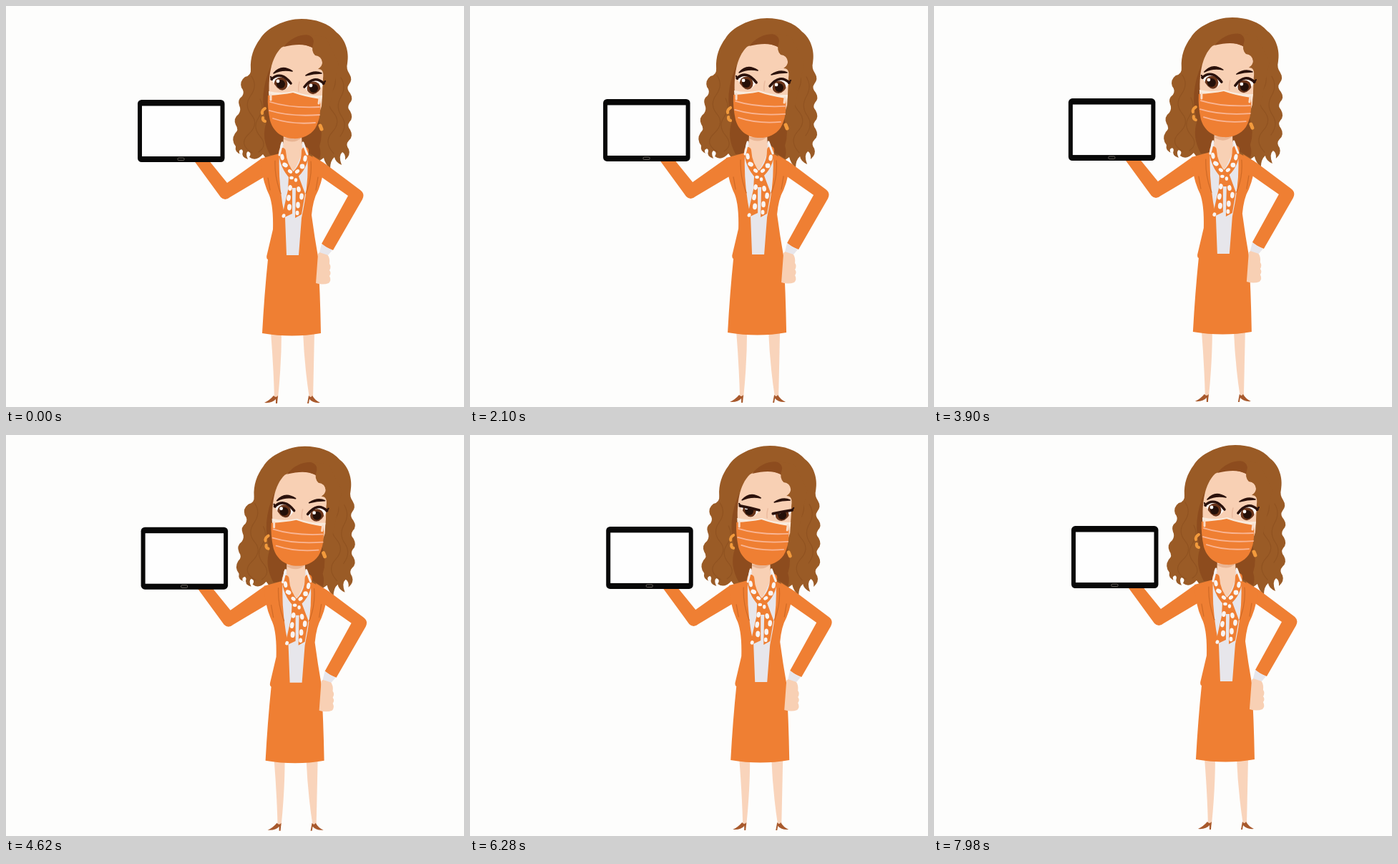
Write an HTML page that moves like this. It is 640 px wide and 560 px high and loops after 8 s.

```html
<!DOCTYPE html>
<html lang="en">
<head>
<meta charset="utf-8">
<title>Presenter with tablet</title>
<style>
  html, body { margin: 0; width: 100%; height: 100%; overflow: hidden; background: #fdfdfc; }
  svg { display: block; width: 100%; height: 100%; }
  .orange { fill: #ef7f33; }
  .hair { fill: #9a5b26; }
  .shade { fill: #8d4c1e; }
  .skin { fill: #f8d0b4; }
  .leg { fill: #f9d4bb; }
  .shirt { fill: #e7e6eb; }
  .shoe { fill: #a8592c; }
  .line { fill: none; stroke-linecap: round; stroke-linejoin: round; }
  .seam { stroke: #cf6a26; stroke-width: 1.2; }
  .pleat { stroke: #f9b594; stroke-width: 1.8; }
  .strand { stroke: #84491b; stroke-width: 1.2; opacity: .45; }
  .dark { stroke: #2b120c; }
</style>
</head>
<body>
<svg viewBox="0 0 640 560" preserveAspectRatio="none">
  <defs>
    <clipPath id="clipL"><path id="openL"/></clipPath>
    <clipPath id="clipR"><path id="openR"/></clipPath>
  </defs>
  <rect width="640" height="560" fill="#fdfdfc"/>
  <g id="figure">
    <!-- hair -->
    <path class="hair" d="M413 18 C432 18 451 24 462 37 C474 46 480 64 477 80
      Q475 88 480 95 Q485 103 479 110 Q475 115 481 122 Q486 130 480 136
      Q476 142 481 147 Q486 156 480 162 Q476 167 481 173 Q486 182 479 188
      Q474 193 479 200 Q482 208 474 215 Q475 207 470 204 Q464 209 469 222
      Q460 218 459 211 Q453 216 453 227 Q446 221 444 212 L430 222 H370
      L359 207 Q349 218 340 211 Q344 205 338 203 Q334 206 338 214
      Q328 211 331 203 Q330 198 326 202 Q325 207 329 207
      Q319 205 321 196 Q314 187 320 178 Q326 173 321 166
      Q317 157 325 151 Q329 145 326 139 Q323 131 330 126
      Q334 120 329 114 Q326 105 334 99 Q343 97 342 88
      C341 72 346 58 355 46 C364 31 389 18 413 18Z"/>
    <g class="line strand">
      <path d="M343 98 q9 13 -1 27 t1 27 t-4 27 t5 26"/>
      <path d="M355 130 q7 13 -2 26 t2 26 t-2 22"/>
      <path d="M456 92 q9 14 -1 28 t2 28 t-1 28 t2 30"/>
      <path d="M468 100 q8 13 0 27 t1 27 t-2 28"/>
    </g>
    <path class="shade" d="M370 84 Q352 125 364 162 Q356 184 369 208 L388 207 L392 178 Z"/>
    <path class="shade" d="M411 180 L437 158 Q444 178 438 196 Q441 206 438 214 L414 200Z"/>

    <!-- legs and shoes -->
    <path class="leg" d="M370 455 H385 Q385 498 380 548 H375 Q374 506 370 455Z"/>
    <path class="leg" d="M415 455 H431 Q430 505 429 548 H424 Q417 503 415 455Z"/>
    <path class="shoe" d="M361 554 Q368 551 374 544 Q377 548 380 544 L379 555 H377 L377 549 Q372 555 361 554Z"/>
    <path class="shoe" d="M439 554 Q432 551 428 544 Q426 548 423 544 L421 555 H423 L424 549 Q429 555 439 554Z"/>

    <!-- sleeves -->
    <path class="orange" d="M262 215 H283 L309 247 L357 213 L372 232 L313 267 Q306 273 300 267Z"/>
    <path class="orange" d="M428 209 L447 221 L495 257 Q502 262 498 270 L457 341 Q448 338 441 332 L478 265 L438 237Z"/>

    <!-- neck and shirt -->
    <path class="shirt" d="M384 192 L380 220 L390 348 H410 L423 220 L416 192Z"/>
    <path class="skin" d="M388 178 H413 L414 204 Q408 221 402 230 Q390 220 387 204Z"/>
    <path d="M388 184 H413 Q402 194 388 186Z" fill="#e9b594"/>

    <!-- jacket and skirt -->
    <path class="orange" d="M382 206 L356 213 Q357 240 366 260 Q374 275 373 312 L365 346
      Q363 353 366 354 Q361 402 358 457 Q400 464 440 457 Q439 400 436 350
      Q431 322 427 292 Q429 270 436 258 Q444 239 444 219 L421 207
      Q424 245 413 296 L409 348 H392 L390 296 Q380 250 382 206Z"/>
    <g class="line seam">
      <path d="M376 216 Q375 239 384 262"/>
      <path d="M426 217 Q428 240 419 262"/>
      <path d="M366 240 L369 257"/>
      <path d="M436 239 L433 257"/>
    </g>

    <!-- hand on hip -->
    <path class="skin" d="M436 346 L442 341 L449 347 Q453 352 452 360 Q455 364 452 369 Q455 373 452 377 Q455 383 451 387 Q443 390 433 387Z"/>
    <path class="shirt" d="M441 332 Q448 338 456 341 L450 348 L438 344Z"/>

    <!-- scarf -->
    <path class="line" stroke="#ef7f33" stroke-width="10" d="M386 203 Q387 224 401 238 Q418 225 418 202"/>
    <path class="line" stroke="#f5f2f2" stroke-width="3" d="M386 191 L382 208 M415 191 L421 207"/>
    <path class="orange" d="M395 238 Q402 230 409 238 L418 262 L413 291 L404 296 L405 254 L400 254 L400 290 L385 297 L394 257Z"/>
    <g id="spots" fill="#f9f5f4"></g>

    <!-- face -->
    <path class="skin" d="M368 126 C366 100 370 72 385 58 C398 51 416 51 432 60 C443 70 444 84 444 96 L441 140 Q428 182 401 183 Q374 180 368 126Z"/>
    <path class="shade" d="M388 57 Q406 35 433 42 L436 66 Q425 48 388 57Z"/>
    <path class="hair" d="M417 39 Q433 42 429 54 Q426 63 432 69 Q441 70 442 79 Q442 84 436 88 Q445 88 443 101 L442 133 L451 145 L465 80 L446 43Z"/>
    <path class="line" stroke="#ebbb9f" stroke-width="1.5" d="M410 106 Q408 114 409 119"/>

    <!-- eyes -->
    <g clip-path="url(#clipL)">
      <rect x="364" y="90" width="40" height="34" fill="#fffaf6"/>
      <circle cx="384" cy="109" r="9.5" fill="#6b351a"/>
      <circle cx="384" cy="109" r="6" fill="#241009"/>
      <circle cx="380" cy="105" r="2.4" fill="#fff"/>
    </g>
    <g clip-path="url(#clipR)">
      <rect x="410" y="96" width="40" height="34" fill="#fffaf6"/>
      <circle cx="430" cy="115" r="9.5" fill="#6b351a"/>
      <circle cx="430" cy="115" r="6" fill="#241009"/>
      <circle cx="426" cy="111" r="2.4" fill="#fff"/>
    </g>
    <g class="line dark" stroke-width="3.6">
      <path id="lashL"/>
      <path id="lashR"/>
      <path stroke-width="2.2" d="M372 103 L370 99 M443 109 L446 105"/>
    </g>
    <path d="M374 94 Q385 81 400 91 Q386 88 374 94Z M419 97 Q431 89 441 94 Q430 94 419 97Z" fill="#2b120c" stroke="#2b120c" stroke-width="1.6" stroke-linejoin="round"/>

    <!-- mask -->
    <path d="M367 119 Q385 123 402 119 Q420 126 442 125 L440 136 H368Z" fill="#f9ebdd"/>
    <path class="orange" d="M366 125 Q386 124 401 121 Q418 127 439 130 C440 146 439 159 432 171 C424 182 412 186 400 185 C384 184 373 174 369 160 Q365 142 366 125Z"/>
    <g class="line pleat">
      <path d="M369 134 Q398 143 438 141"/>
      <path d="M368 146 Q398 155 438 152"/>
      <path d="M373 157 Q400 166 432 163"/>
    </g>
    <path class="line" stroke="#f9dcc8" stroke-width="3" d="M370 124 V131 M438 129 L437 136"/>

    <!-- earrings -->
    <path class="line" stroke="#f29a3c" stroke-width="4" d="M362 143 Q357 146 358 150 M359 156 Q358 160 362 161"/>
    <path class="line" stroke="#f29a3c" stroke-width="5" d="M439 167 L441 172"/>

    <!-- tablet -->
    <rect x="184" y="131" width="121.5" height="87" rx="5.5" fill="#080808"/>
    <rect x="190" y="139.5" width="109.5" height="70.5" fill="#fefefe"/>
    <rect x="240" y="212" width="9" height="3.6" rx="1.2" fill="none" stroke="#66605a"/>
  </g>
</svg>
<script>
const LOOP = 8000, STEPS = 172;
const DRIFT_X = 8, DRIFT_Y = -4;
const BLINK_AT = 135, BLINK_HALF = 3;
const byId = id => document.getElementById(id);
const set = (id, name, value) => byId(id).setAttribute(name, value);

// x, y, rx, ry, tilt
const spots = [
  [386, 211, 2.6, 4.4, -10], [390, 222, 4, 3, 30], [397, 231, 3.4, 2.4, 35],
  [418, 213, 2.6, 4.4, 10], [414, 224, 3.4, 3.4, 0], [407, 231, 3.4, 2.4, -35],
  [399, 240, 2.8, 2.2, 0], [405, 243, 2.2, 2.8, 0], [397, 254, 2.8, 4, 10],
  [409, 256, 2.8, 4, -10], [395, 268, 2.8, 4.4, 10], [413, 266, 2.8, 4.4, 5],
  [396, 281, 3, 4.4, 5], [408, 278, 2.8, 4.4, 0], [388, 293, 2.4, 2.8, 20],
  [407, 289, 2.4, 3.2, 0]
];
byId("spots").innerHTML = spots.map(([x, y, rx, ry, a]) =>
  `<ellipse cx="${x}" cy="${y}" rx="${rx}" ry="${ry}" transform="rotate(${a} ${x} ${y})"/>`).join("");

// Corners at (x0, y0) and (x1, y1); the upper lid drops as closed goes to 1.
function drawEye(side, x0, y0, x1, y1, closed) {
  const midX = (x0 + x1) / 2, midY = (y0 + y1) / 2;
  const upper = `M${x0} ${y0}Q${midX} ${midY - 15 + 22 * closed} ${x1} ${y1}`;
  set("open" + side, "d", `${upper}Q${midX} ${midY + 25} ${x0} ${y0}Z`);
  set("lash" + side, "d", upper);
}

// Playback repeats holds of 20, 100 and 20 ms, one equal step of motion each.
function stepAt(t) {
  const phase = t % 140;
  return 3 * Math.floor(t / 140) + (phase < 20 ? 0 : phase < 120 ? 1 : 2);
}

function draw(t) {
  const step = stepAt(t), p = step / STEPS;
  set("figure", "transform", `translate(${DRIFT_X * p} ${DRIFT_Y * p})`);
  const closed = Math.max(0, 1 - Math.abs(step - BLINK_AT) / BLINK_HALF);
  drawEye("L", 371, 102, 398, 108, closed);
  drawEye("R", 417, 113, 444, 108, closed);
}

const start = performance.now();
function tick() {
  draw((performance.now() - start) % LOOP);
  requestAnimationFrame(tick);
}
tick();
</script>
</body>
</html>
```
